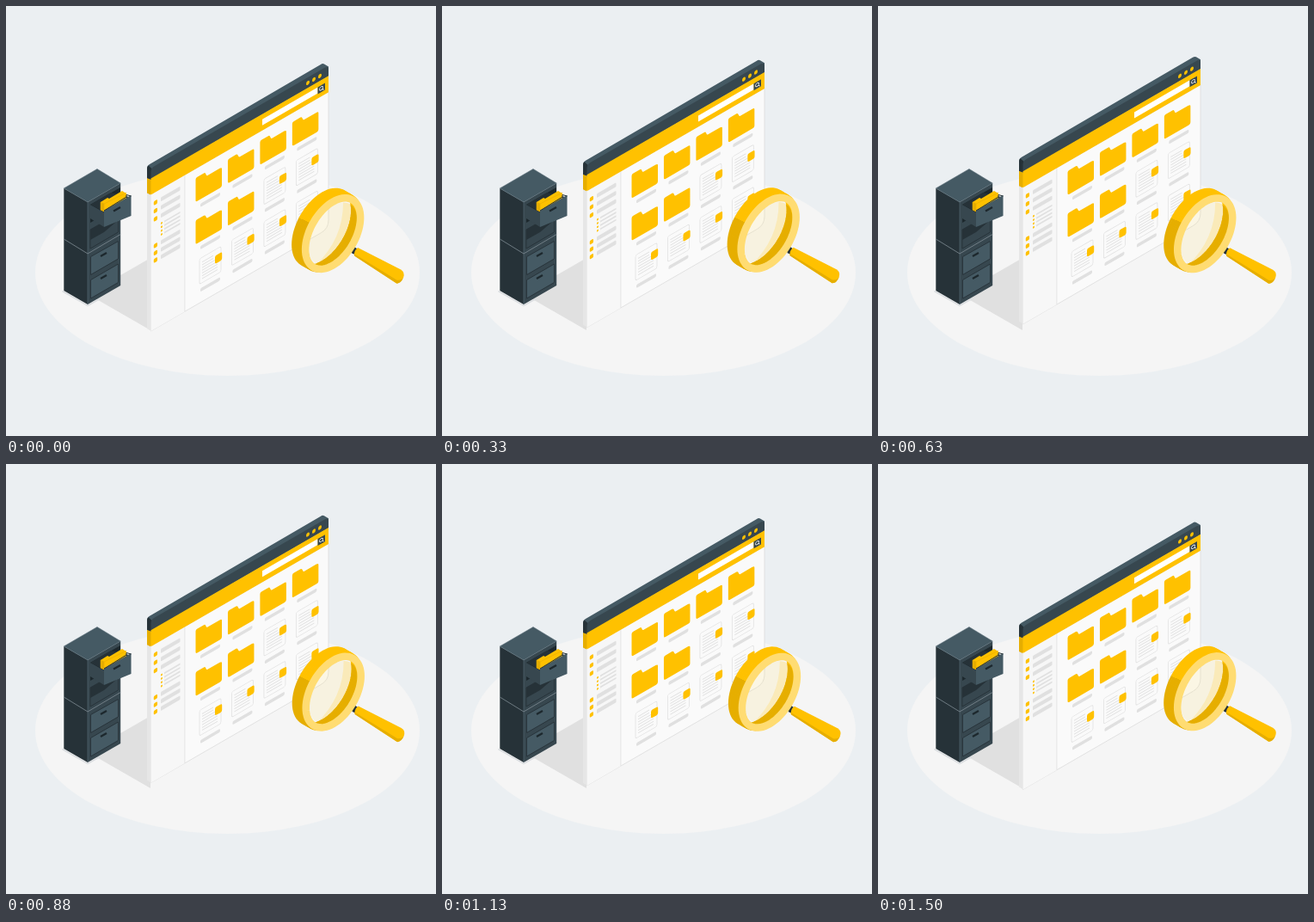
Recreate the animation shown at these times as an HTML page. Size 500 by 500 pixels, loop 1.54 s.

```html
<!DOCTYPE html>
<html lang="en">
<head>
<meta charset="utf-8">
<title>File search</title>
<style>
html, body { margin: 0; width: 100%; height: 100%; overflow: hidden; background: #ebeff2; }
svg { display: block; width: 100vw; height: 100vh; }
</style>
</head>
<body>
<svg viewBox="0 0 500 500">
  <defs>
    <linearGradient id="rim" gradientUnits="userSpaceOnUse" x1="340" y1="255" x2="347" y2="240">
      <stop offset=".5" stop-color="#e6ae00"/><stop offset=".5" stop-color="#ffc100"/>
    </linearGradient>
    <clipPath id="lens"><ellipse rx="28" ry="28" transform="matrix(1 -.577 0 1.155 380 264.500)"/></clipPath>
  </defs>

  <ellipse cx="257.500" cy="310" rx="223.500" ry="120" fill="#f5f5f5"/>
  <path d="M168 377L95 335L168 293Z" fill="#e0e0e0"/>

  <g id="cabinet">
    <path d="M65.500 331.500L95 348.500L110 340" fill="none" stroke="#dadde0" stroke-width="1.500"/>
    <path d="M67.300 212L95 228V347L67.300 331Z" fill="#263238"/>
    <path d="M95 228L133.200 206V325L95 347Z" fill="#37474f"/>
    <path d="M67.300 212L106 189.500L133.200 206L95 228Z" fill="#455a64"/>
    <path d="M95 347V228L67.300 212L106 189.500L133.200 206L95 228" fill="none" stroke="#5d707a" stroke-width=".6"/>
    <path d="M67.300 271L95 288L133.200 265.500" fill="none" stroke="#7f8c93" stroke-width=".8"/>
    <path d="M98 231L133 211V232L98 252Z" fill="#1d282d"/>
    <g fill="#455a64" stroke="#263238" stroke-width=".9">
      <path d="M98 260L130.500 241.500V263L98 282Z" fill="#37474f"/>
      <path d="M98.500 291.500L130.500 273.500V294L98.500 312.500Z"/>
      <path d="M98.500 318.500L130.500 300V321.500L98.500 340Z"/>
    </g>
    <path d="M98 260L130.500 241.500V249L114 263L98 272Z" fill="#263238"/>
    <path d="M98 231L114 240V257L98 247Z" fill="#37474f"/>
    <path d="M98 231L122 217L143 222L114 239Z" fill="#263238"/>
    <path d="M110 228L118 223L120 224L135 215L140 218V224L114 239L110 237Z" fill="#ffc100"/>
    <path d="M110 228L114 230V239L110 237ZM114 230L140 217" fill="#e6ae00" stroke="#e6ae00" stroke-width=".6"/>
    <path d="M114 238L145.500 220V244L114 257Z" fill="#455a64"/>
    <path d="M114 238L140 222V219.500L145.500 221" fill="none" stroke="#263238"/>
    <path d="M125 238.500L133 234M110 291L117 287M110 317L117 313" stroke="#1d282d" stroke-width="2.300"/>
  </g>

  <g id="win">
    <path d="M164 216L169 219V378L164 375Z" fill="#e6e6e6"/>
    <path d="M164 199L169 202V220L164 217.500Z" fill="#e6ae00"/>
    <path d="M164 200V189Q164 185.500 167 184L366 68Q368 66.500 370 67.500L375 70.500V78L169 202Z" fill="#455a64"/>
    <path d="M164 200V189Q164 186.500 165.500 185.500L169.500 189V202Z" fill="#263238"/>
    <g id="face" transform="matrix(1 -.5774 0 1 168.500 0)"></g>
  </g>

  <g id="glass">
    <path d="M401 282.500L405 280L409 283L407 289.500L402 287.500Z" fill="#263238"/>
    <path d="M409 281L459 306.500Q464 309.500 462 315.500Q459 322.500 454 322.500L405 290.500Q404 284.500 409 281Z" fill="#ffc100"/>
    <path d="M404.500 288L454 318.500Q459 319.500 462 315.500Q459 323 454 322.500L405 290.500Z" fill="#e6ae00"/>
    <g clip-path="url(#lens)" fill="#ffdc72">
      <rect x="330" y="210" width="90" height="105" opacity=".16"/>
      <path d="M391 215H415V262L350 310Q398 272 391 215Z" opacity=".36"/>
    </g>
    <g id="outer" fill="none"></g>
    <g id="inner" fill="none" clip-path="url(#lens)"></g>
    <g id="front" fill="none"></g>
  </g>
</svg>
<script>
const NS = 'http://www.w3.org/2000/svg';
const $ = id => document.getElementById(id);
const add = (parent, tag, attrs) => {
  const el = document.createElementNS(NS, tag);
  for (const k in attrs) el.setAttribute(k, attrs[k]);
  return parent.appendChild(el);
};
const face = $('face');
const box = (x, y, width, height, fill, rx = 0, more) =>
  add(face, 'rect', { x, y, width, height, fill, rx, ...more });
const shape = (d, fill, more) => add(face, 'path', { d, fill, ...more });

const YELLOW = '#ffc100', DARK = '#37474f', GREY = '#e0e0e0';

// Window panel
shape('M0 219H206.500V368Q206.500 378 198 378H0Z', '#fafafa', { stroke: '#dcdcdc', 'stroke-width': .7 });
box(0, 219, 39.500, 159, '#f7f7f7');
box(39, 219, .8, 159, GREY);
shape('M0 201V193Q0 188.500 4 188.500H202Q206.500 188.500 206.500 193.500V201Z', DARK);
box(0, 200.500, 206.500, 19, YELLOW);
for (const x of [182.500, 189.500, 196.500])
  add(face, 'ellipse', { cx: x, cy: 194.800, rx: 2, ry: 2.300, fill: YELLOW });
box(129.500, 206.500, 64.500, 7, '#fff');
box(194, 206.500, 8.500, 8, DARK);
add(face, 'circle', { cx: 198, cy: 210.200, r: 1.900, fill: 'none', stroke: '#fff', 'stroke-width': .8 });
shape('M199.400 211.600L201 213.300', 'none', { stroke: '#fff', 'stroke-width': .8 });

// Sidebar
for (const v of [231.500, 241, 250.500, 281.500, 290, 298.500]) {
  box(3.300, v - 2.300, 4.200, 4.800, YELLOW, 1.300);
  box(11.500, v - 2.300, 22.500, 4.800, GREY, 1);
}
for (let i = 0; i < 4; i++) {
  const v = 259.500 + i * 4.350;
  box(11.500, v - 1, 1.900, 2.200, YELLOW, .6);
  box(15.500, v - .9, 18.500, 1.900, GREY);
}

// Files
const folder = (x, v) => shape(
  `M${x} ${v + 3}q0-2 2-2h7.500q1.500 0 2 1.500l1 2.500q.5 1 1.500 1h14q2.500 0 2.500 2v19q0 2-2 2h-26.500q-2 0-2-2z`, YELLOW);
const doc = (x, v) => {
  box(x + 4.500, v, 25, 29.500, '#fafafa', 2, { stroke: '#e2e2e2', 'stroke-width': .8 });
  for (let i = 0; i < 7; i++)
    box(x + 7.500, v + 5 + i * 3.200, i < 2 ? 13 : 18, 1, GREY);
  box(x + 22.500, v + 7, 8.200, 9.500, YELLOW, 2);
};
for (let row = 0; row < 3; row++)
  for (let col = 0; col < 4; col++) {
    const x = 52 + col * 37.450, v = 229 + row * 49.300;
    if (row === 0 || row === 1 && col < 2) folder(x, v);
    else doc(x, v - 1);
    box(x + 5.500, v + 34, 23, 4, GREY, 1.500);
  }

// Magnifier rim: stacked outlines for the walls, pale front face on top
const ring = (parent, depth, stroke, r, width) => {
  const pts = Array.from({ length: 72 }, (_, i) => {
    const a = i * Math.PI / 36, x = r * Math.cos(a);
    return [380 - depth + x, 264.500 - .577 * (depth + x) + 1.155 * r * Math.sin(a)].map(n => n.toFixed(2));
  });
  add($(parent), 'polygon', { points: pts.join(' '), stroke, 'stroke-width': width });
};
for (let depth = 12; depth > 0; depth -= 2) {
  ring('outer', depth, 'url(#rim)', 34.500, 3);
  ring('inner', depth, '#e6ae00', 34.500, 3);
}
ring('front', 0, '#ffdc72', 32, 8.500);

// Floating motion: straight ramps up and down
const LOOP = 1540;
const ramp = (t, low) => 1 - Math.abs(2 * (((t - low) / LOOP + 1) % 1) - 1);
const start = performance.now();
const draw = () => {
  const t = (performance.now() - start) % LOOP;
  $('win').setAttribute('transform', `translate(0 ${.6 - 10 * ramp(t, -46)})`);
  const s = ramp(t, 290) - .3;
  $('glass').setAttribute('transform', `translate(${1.500 * s} ${1.300 * s})`);
  requestAnimationFrame(draw);
};
draw();
</script>
</body>
</html>
```
